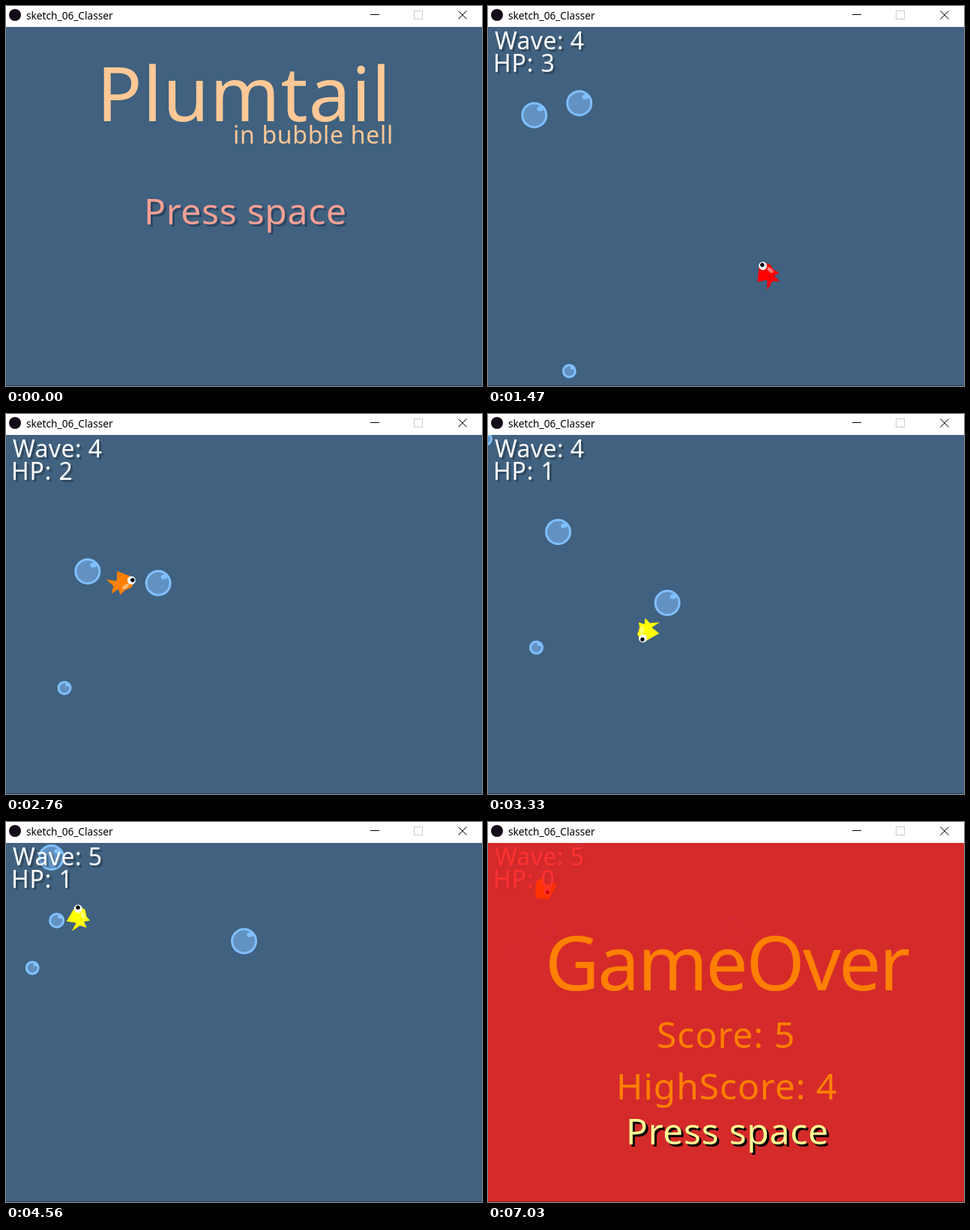
Write an HTML page with a canvas that moves like this. It is 635x508 px and loops after 7.13 s.

```html
<!DOCTYPE html>
<html lang="en">
<head>
<meta charset="utf-8">
<title>sketch_06_Classer</title>
<style>
  html, body { margin: 0; width: 100%; height: 100%; overflow: hidden; background: #fff; }
  canvas { display: block; }
</style>
</head>
<body>
<canvas id="stage" width="635" height="508"></canvas>
<script>
const ctx = document.getElementById("stage").getContext("2d");
const W = 635, H = 508, BAR = 28;
const LOOP = 7130, STEP = 47.5;
const START = 50, REF = 1470, HIT1 = 2517, HIT2 = 3220, WAVE5 = 3850, DEATH = 4748;
const SANS = '"Noto Sans", "Open Sans", sans-serif';
const WATER = [64, 97, 127], RIM = [128, 192, 255], GLASS = [98, 146, 194];
const WHITE = [255, 255, 255], BLACK = [0, 0, 0];
const ORANGE = "rgb(255,128,0)", PEACH = "rgb(255,200,150)";

// Place at REF and speed in px/ms; touching the fish sends a bubble off at speed "out".
const bubbles = [
  { r: 17.5, x: 61.5, y: 145.5, v: [.0514, .0833], hit: HIT1, out: [-.0268, -.0925] },
  { r: 17.5, x: 121.5, y: 129.5, v: [.0634, .075], hit: HIT2, out: [.0634, -.0756] },
  { r: 9.5, x: 108.5, y: 488.5, v: [-.0237, -.0949] },
  { r: 10.5, x: -113.3, y: -115.7, v: [.0585, .08] }
];

// Turning points of the fish: [time, x, y]
const swim = [
  [START, 310, 372], [500, 345, 396], [1150, 386, 388], [REF, 375, 359], [1900, 288, 300],
  [2190, 203, 302], [HIT1, 137, 266], [2800, 160, 225], [3200, 212, 258], [3330, 211, 288],
  [3500, 205, 328], [3800, 163, 284], [4560, 99, 129.5], [DEATH, 77, 89]
];

const body = [[-17, -5], [-8, -11], [2, -9], [13, -11], [10, -3], [24, -3], [14, 4], [18, 17], [5, 7], [-4, 18], [-16, 1]];
const crumpled = [[-13, -9], [-7, -14], [1, -5], [15, -7], [10, 4], [3, 15], [-14, 12]];

function curve(keys, t) {
  const last = keys.length - 1;
  let i = 0;
  while (i < last - 1 && t >= keys[i + 1][0]) i++;
  const a = keys[i], b = keys[i + 1], span = b[0] - a[0];
  const p = keys[Math.max(0, i - 1)], n = keys[Math.min(last, i + 2)];
  const k = Math.max(0, Math.min(1, (t - a[0]) / span)), k2 = k * k, k3 = k2 * k;
  return [1, 2].map(c => {
    const va = (b[c] - p[c]) / (b[0] - p[0]) * span;
    const vb = (n[c] - a[c]) / (n[0] - a[0]) * span;
    return (2 * k3 - 3 * k2 + 1) * a[c] + (k3 - 2 * k2 + k) * va + (3 * k2 - 2 * k3) * b[c] + (k3 - k2) * vb;
  });
}

// The red wash pulls each channel toward pure red and sticks 42 levels short.
let wash = 0;
const decay = gap => Math.max(Math.min(gap, 42), gap * Math.exp(-wash / 1400));
const tint = ([r, g, b]) => `rgb(${255 - decay(255 - r)},${decay(g)},${decay(b)})`;

// x is the left edge of the ink, y the baseline.
function text(str, x, y, size, spacing, fill, shade, drop = 3) {
  ctx.font = `${size}px ${SANS}`;
  ctx.letterSpacing = spacing + "px";
  const left = x + ctx.measureText(str).actualBoundingBoxLeft;
  if (shade) {
    ctx.fillStyle = shade;
    ctx.fillText(str, left + drop, y + drop);
  }
  ctx.fillStyle = fill;
  ctx.fillText(str, left, y);
}

function oval(x, y, rx, ry, fill, turn = 0) {
  ctx.beginPath();
  ctx.ellipse(x, y, rx, ry, turn, 0, Math.PI * 2);
  ctx.fillStyle = fill;
  ctx.fill();
}

function poly(points, fill) {
  ctx.beginPath();
  points.forEach(([x, y]) => ctx.lineTo(x, y));
  ctx.closePath();
  ctx.fillStyle = fill;
  ctx.fill();
}

function line(x1, y1, x2, y2) {
  ctx.beginPath();
  ctx.moveTo(x1, y1);
  ctx.lineTo(x2, y2);
  ctx.stroke();
}

function drawBubble({ r, x, y, v, hit = Infinity, out = v }, t) {
  const before = Math.min(t, hit) - REF, after = Math.max(0, t - hit);
  x += v[0] * before + out[0] * after;
  y += v[1] * before + out[1] * after;
  const top = BAR + r;
  if (after) y = top + Math.abs(y - top);

  const rim = tint(RIM), s = r / 17.5;
  oval(x, y, r - 1.5, r - 1.5, tint(GLASS));
  ctx.strokeStyle = rim;
  ctx.lineWidth = 3;
  ctx.stroke();
  oval(x + 8 * s, y - 8.5 * s, 2 + 2.4 * s, 1.8 + 1.4 * s, rim, -.15);
}

function drawFish(t) {
  const skin = [255, t < HIT1 ? 0 : t < HIT2 ? 128 : 255, 0];
  const [x, y] = curve(swim, t);
  ctx.save();
  ctx.translate(x, y);
  if (t >= DEATH) {
    poly(crumpled, tint(skin));
    oval(2, 4, 5, 5, tint(WHITE));
    oval(2.5, 5, 2.5, 2.5, tint(BLACK));
  } else {
    // Drawn facing left, turned to the direction of travel; the tail folds in on steep turns.
    const [x0, y0] = curve(swim, t - 10), [x1, y1] = curve(swim, t + 10);
    const turn = Math.atan2(y0 - y1, x0 - x1);
    const tail = .6 + .4 * Math.cos(turn) ** 4;
    ctx.rotate(turn);
    poly(body.map(([px, py]) => [px > 0 ? px * tail : px, py]), tint(skin));
    oval(-2, -5.5, 5, 2.6, tint(skin.map(c => c + (255 - c) * .45)));
    oval(-13, -3, 5.5, 5.5, "#fff");
    oval(-14.5, -3.5, 2.7, 2.7, "#000");
  }
  ctx.restore();
}

function drawTitle() {
  text("Plumtail", 130, 154, 100, 1, PEACH);
  text("in bubble hell", 305, 184, 32, .7, PEACH);
  text("Press space", 188, 292, 48, .7, "rgb(246,160,148)", "rgba(20,40,70,.45)");
}

function drawGame(t) {
  const now = Math.min(t, DEATH);
  bubbles.forEach(b => drawBubble(b, now));
  drawFish(now);
  const hp = 3 - [HIT1, HIT2, DEATH].filter(hit => t >= hit).length;
  const ink = tint(WHITE);
  const shade = `rgba(0,0,0,${.25 * Math.exp(-wash / 900)})`;
  text("Wave: " + (t < WAVE5 ? 4 : 5), 9, 58, 32, .4, ink, shade);
  text("HP: " + hp, 10, 88, 32, .9, ink, shade);
}

function drawGameOver() {
  text("GameOver", 82, 225, 100, -2.6, ORANGE);
  text("Score: 5", 227, 302, 48, 1, ORANGE);
  text("HighScore: 4", 175, 371, 48, .9, ORANGE);
  const glow = 165 + 90 * Math.min(1, wash / 2280) ** 1.4;
  const dark = 1 - .7 * Math.exp(-wash / 200);
  text("Press space", 188, 431, 48, .7, `rgb(255,${glow},150)`, `rgba(0,0,0,${dark})`);
}

function drawWindow() {
  ctx.fillStyle = "#fff";
  ctx.fillRect(0, 0, W, BAR);
  oval(12, 12, 8, 8, "#140c18");
  text("sketch_06_Classer", 27, 18, 13.7, 0, "#000");
  ctx.lineWidth = 1;
  ctx.strokeStyle = "#000";
  line(486, 11.5, 498, 11.5);
  line(603.5, 6.5, 614.5, 17.5);
  line(614.5, 6.5, 603.5, 17.5);
  ctx.strokeStyle = "#ccc";
  ctx.strokeRect(544.5, 6.5, 11, 11);
  ctx.fillStyle = "rgba(0,0,0,.35)";
  ctx.fillRect(0, H - 1, W, 1);
}

function draw(time) {
  const t = time % LOOP;
  const q = START + Math.max(0, Math.floor((t - START + 8) / STEP)) * STEP;
  wash = Math.max(0, q - DEATH);
  ctx.fillStyle = tint(WATER);
  ctx.fillRect(0, 0, W, H);
  if (t < START) drawTitle();
  else {
    drawGame(q);
    if (q >= DEATH) drawGameOver();
  }
  drawWindow();
}

let begin;
function tick(now) {
  begin ??= now;
  draw(now - begin);
  requestAnimationFrame(tick);
}
draw(0);
requestAnimationFrame(tick);
</script>
</body>
</html>
```
